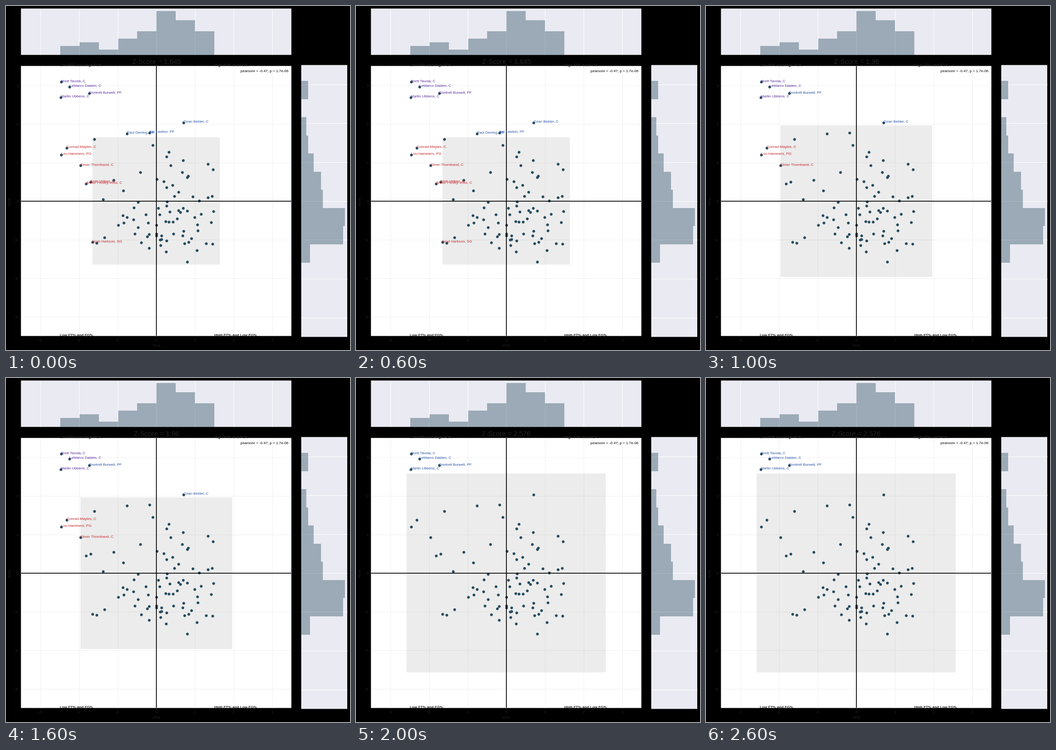
A matplotlib script that plays this animation: 748x749 px, repeating every 3000 ms.

```python
import matplotlib.pyplot as plt
import numpy as np
from matplotlib.animation import FuncAnimation
from matplotlib.patches import Rectangle

W, H, DPI = 748, 749, 64
PT = 72 / DPI                      # points per pixel
CX, CY, UNIT = 326.75, 424.75, 84.07
INK, SLATE, PANEL = "#262626", "#264b5e", "#eaeaf2"
BOTH, X_ONLY, Y_ONLY = "#5a2ca0", "#c8282d", "#2a55a8"
LEVELS = [1.645, 1.96, 2.576]

# Outstanding players, in stage pixels
PLAYERS = [
    ("Brett Tavola, C", 120, 165), ("LeMarco Dalden, C", 138, 175.5),
    ("Dontrell Burwell, PF", 181, 190), ("Martin Ubbens, C", 119, 198.5),
    ("Ozan Belder, C", 386, 253.5), ("Paul Derring, PF", 263.5, 278),
    ("Kip Lawton, PF", 312.5, 276), ("Conrad Mayles, C", 132.5, 309),
    ("Lou Hammers, PG", 120, 323.5), ("Elmer Thornband, C", 161.8, 347),
    ("Emir Velkan, C", 184, 383), ("Arthur Penley-Voss, C", 174.5, 387),
    ("Noel Harkson, SG", 188, 514),
]
# Players per histogram bin, left to right and top to bottom
FT_COUNTS = np.array([5, 7, 3, 9, 13, 24, 19, 13])
FG_COUNTS = np.array([4, 0, 3, 4, 7, 11, 12, 24, 23, 5])
FT_EDGES = 118 + 41.85 * np.arange(len(FT_COUNTS) + 1)
FG_EDGES = 163 + 39.55 * np.arange(len(FG_COUNTS) + 1)

rng = np.random.default_rng(7)
plt.rcParams["font.family"] = "Liberation Sans"
fig = plt.figure(figsize=(W / DPI, H / DPI), dpi=DPI, facecolor="black")
ax = fig.add_axes([0, 0, 1, 1])
ax.set_xlim(0, W)
ax.set_ylim(H, 0)
ax.axis("off")


def box(x0, y0, x1, y1, color, z=1, alpha=1, snap=None):
    patch = Rectangle((x0, y0), x1 - x0, y1 - y0, fc=color, lw=0,
                      alpha=alpha, zorder=z, snap=snap)
    return ax.add_patch(patch)


def line(xs, ys, color, width, z=2):
    ax.plot(xs, ys, color=color, lw=width * PT, zorder=z,
            solid_capstyle="butt")


def text(x, y, s, size=8, color=INK, ha="left", va="baseline", **kw):
    return ax.text(x, y, s, fontsize=size * PT, color=color, ha=ha, va=va,
                   zorder=6, **kw)


def fill_bins(counts, edges, taken, center):
    """Random positions that complete the histogram inside the inner zone."""
    left = counts - np.histogram(taken, edges)[0]
    spots = np.repeat(edges[:-1], left)
    spots = spots + rng.random(len(spots)) * (edges[1] - edges[0])
    return np.clip(spots, center - 1.6 * UNIT, center + 1.6 * UNIT)


# Panels, grids and tick labels
box(32.5, 5.5, 620.5, 106.5, PANEL, snap=False)
box(642, 128.5, 742, 720.5, PANEL, snap=False)
box(32.5, 130.5, 620.5, 718.5, "white", snap=False)
for k in range(-3, 4):
    x, y = CX + k * UNIT, CY - k * UNIT
    side_y = CY - k * 84.64
    line([x, x], [6, 106], "white", 1)
    line([642, 742], [side_y, side_y], "white", 1)
    line([x, x], [131, 718], "#f0f0f0", 1)
    line([33, 620], [y, y], "#f0f0f0", 1)
    label = str(k).replace("-", "\u2212")
    text(x, 730, label, ha="center")
    text(27, y + 3, label, ha="right")

# Marginal histograms
for x0, x1, n in zip(FT_EDGES, FT_EDGES[1:], FT_COUNTS):
    box(x0, 107 - 4.008 * n, x1, 107, SLATE, 3, 0.4)
for y0, y1, n in zip(FG_EDGES, FG_EDGES[1:], FG_COUNTS):
    box(641.5, y0, 641.5 + 3.97 * n, y1, SLATE, 3, 0.4)

# Scatter that agrees with both histograms
_, px, py = zip(*PLAYERS)
xs = fill_bins(FT_COUNTS, FT_EDGES, px, CX)
ys = rng.permutation(fill_bins(FG_COUNTS, FG_EDGES, py, CY))
ax.scatter([*px, *xs], [*py, *ys], s=(6 * PT) ** 2, c=SLATE, lw=0, zorder=4)
line([CX, CX], [131, 718], "black", 1.7, 5)
line([33, 620], [CY, CY], "black", 1.7, 5)

# Fixed captions
for x, y, s in [(-2.5, 131, "Low FT% and High FG%"),
                (1.5, 131, "High FT% and FG%"),
                (-2.5, 719, "Low FT% and FG%"),
                (1.5, 719, "High FT% and Low FG%")]:
    text(CX + x * UNIT, y, s, weight="bold")
text(614, 144, "pearsonr = -0.47; p = 1.7e-06", color="black", ha="right")
text(CX, 741.5, "FT%", ha="center")
text(9, CY, "FG%", ha="center", va="center", rotation=90)

title = text(CX, 126, "", 14.7, ha="center")
zone = box(0, 0, 1, 1, "gray", 3, 0.15)
tags = [text(x, y, name) for name, x, y in PLAYERS]


def draw(i):
    z = LEVELS[i]
    half = z * UNIT
    title.set_text(f"Z-Score = {z}")
    zone.set_bounds(CX - half, CY - half, 2 * half, 2 * half)
    for tag, x, y in zip(tags, px, py):
        far_x, far_y = abs(x - CX) > half, abs(y - CY) > half
        tag.set_visible(far_x or far_y)
        tag.set_color(BOTH if far_x and far_y else X_ONLY if far_x else Y_ONLY)
    return [title, zone, *tags]


anim = FuncAnimation(fig, draw, frames=len(LEVELS), interval=1000, repeat=True)
plt.show()
```
